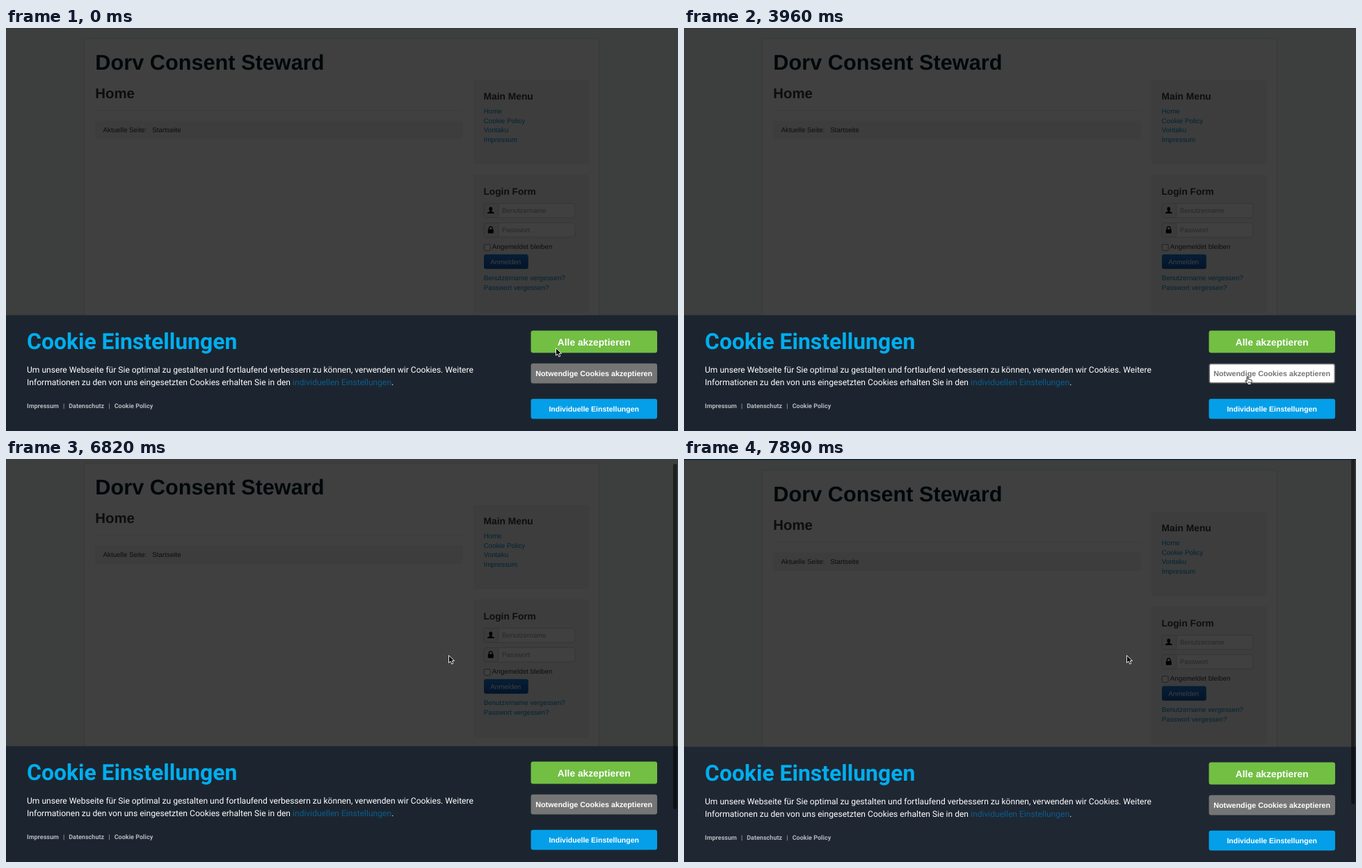
An HTML page for the animation above (8000 ms loop, 966 by 580 pixels).

```html
<!DOCTYPE html>
<html lang="de">
<head>
<meta charset="utf-8">
<title>Cookie Einstellungen</title>
<style>
  html, body { margin: 0; width: 100%; height: 100%; overflow: hidden; background: #1c252f; }
  svg { display: block; width: 966px; height: 580px; text-rendering: geometricPrecision; }
  text { white-space: pre; }
  .page text { font-family: "Liberation Sans", Arial, sans-serif; }
  .banner text { font-family: Roboto, sans-serif; }
  .banner .btn text { font-family: "Liberation Sans", Arial, sans-serif; font-weight: 700; text-anchor: middle; }
</style>
</head>
<body>
<svg id="stage" viewBox="0 0 966 580"></svg>
<script>
const stage = document.getElementById('stage');
const $ = id => document.getElementById(id);

const LINK = '#0088cc', INK = '#333';
const DURATION = 8000;

const rect = (x, y, w, h, fill, extra = '') =>
  `<rect x="${x}" y="${y}" width="${w}" height="${h}" fill="${fill}" ${extra}/>`;
const text = (x, y, size, fill, str, extra = '') =>
  `<text x="${x}" y="${y}" font-size="${size}" fill="${fill}" ${extra}>${str}</text>`;
const bold = 'font-weight="700"';
const small = (x, y, fill, str, extra) => text(x, y, 9.8, fill, str, extra);
const well = (x, y, w, h) => rect(x, y, w, h, '#f2f2f2', 'rx="3"');

function field(y, label) {
  return rect(687, y, 131, 20.5, '#fff', 'rx="3" stroke="#ccc" stroke-width=".8"') +
    rect(687, y, 21, 20.5, '#eee', 'rx="3" stroke="#ccc" stroke-width=".8"') +
    small(713, y + 13.6, '#999', label);
}

function page() {
  const menu = ['Home', 'Cookie Policy', 'Vontaku', 'Impressum'];
  return rect(0, -100, 966, 900, '#f4f6f7') +
    rect(0, -1.2, 966, 1.4, LINK) +
    rect(112.5, 15, 740, 425, '#fff', 'rx="3" stroke="#dcdcdc"') +
    text(128.3, 60.4, 30.7, '#001a27', 'Dorv Consent Steward', bold) +
    text(128.3, 101.3, 20.4, INK, 'Home', bold) +
    rect(128, 118, 529, .8, '#eee') +
    well(128, 133.5, 529, 26.5) +
    small(139.5, 149.6, INK, 'Aktuelle Seite:') +
    small(210.3, 149.6, INK, 'Startseite') +
    well(672, 75, 166, 121) +
    text(686.5, 103, 13.8, INK, 'Main Menu', bold) +
    menu.map((m, i) => small(686.7, 123.2 + i * 13.6, LINK, m)).join('') +
    well(672, 211, 166, 199) +
    text(686.5, 239.6, 13.7, INK, 'Login Form', bold) +
    field(252.5, 'Benutzername') + field(280.5, 'Passwort') +
    '<path d="M692 267v-1.6q2.6-.8 3.7-1.8q-1.3-1.4-1.3-3.6q0-2.6 2.4-2.6t2.4 2.6q0 2.2-1.3 3.6q1.1 1 3.7 1.8v1.6z"/>' +
    rect(692.8, 289.8, 8, 5.6, '#000', 'rx=".6"') +
    '<path d="M694.4 290v-1.8a2.4 2.4 0 0 1 4.8 0v1.8" fill="none" stroke="#000" stroke-width="1.3"/>' +
    rect(687.3, 311.5, 8.8, 8.8, '#fff', 'rx="1.5" stroke="#767676" stroke-width=".9"') +
    small(698.8, 318.3, INK, 'Angemeldet bleiben') +
    rect(687, 325.8, 63.8, 21, 'url(#blue)', 'rx="3"') +
    small(696.2, 339.5, '#fff', 'Anmelden') +
    small(686.7, 363.4, LINK, 'Benutzername vergessen?') +
    small(686.7, 377, LINK, 'Passwort vergessen?') +
    rect(128, 448, 710, .8, '#eaeaea') +
    small(128.3, 479, INK, '© 2020 Dorv Consent Steward') +
    small(838, 479, LINK, 'Nach oben', 'text-anchor="end"');
}

const buttons = [
  { id: 'all', y: 435.5, h: 32, color: '#72bf44', size: 13.75, dy: 21.4, label: 'Alle akzeptieren' },
  { id: 'need', y: 482.8, h: 28.6, color: '#757575', size: 10.75, dy: 18, label: 'Notwendige Cookies akzeptieren' },
  { id: 'own', y: 533.8, h: 28.8, color: '#049fe8', size: 10.5, dy: 18.2, label: 'Individuelle Einstellungen' }
];

const button = b => `<g class="btn" id="${b.id}">` +
  rect(755.3, b.y + .75, 180, b.h - 1.5, b.color, `rx="2.5" stroke="${b.color}" stroke-width="1.5"`) +
  text(845.2, b.y + b.dy, b.size, '#fff', b.label) + '</g>';

function banner() {
  const foot = [[30, 'Impressum'], [90.2, 'Datenschutz'], [155.7, 'Cookie Policy']];
  return rect(0, 413.3, 966, 164.7, '#1c252f', 'id="panel"') +
    text(30, 462, 31.9, '#00aeef', 'Cookie Einstellungen', bold) +
    text(30, 495.6, 12.08, '#fff', 'Um unsere Webseite für Sie optimal zu gestalten und fortlaufend verbessern zu können, verwenden wir Cookies. Weitere') +
    text(30, 513.8, 12.08, '#fff', 'Informationen zu den von uns eingesetzten Cookies erhalten Sie in den <tspan fill="#0b5d8d">individuellen Einstellungen</tspan>.') +
    foot.map(([x, s]) => text(x, 547, 9.06, '#b4b8bc', s, bold)).join('') +
    [82, 147.3].map(x => text(x, 547, 9.06, '#b4b8bc', '|')).join('') +
    buttons.map(button).join('');
}

// Each cursor is drawn from the top left corner of its box.
const cursors = {
  arrow: '<path d="M.5 .7V11.4L3 9.1L4.8 13.1L6.8 12.2L5.1 8.4H8.5Z" fill="#000" stroke="#fff" stroke-width=".9" stroke-linejoin="round"/>',
  beam: ['#fff" stroke-width="2.2', '#000" stroke-width="1'].map(s =>
    `<path d="M1 1Q3.5 1 3.5 3V11Q3.5 13 1 13M6 1Q3.5 1 3.5 3M3.5 11Q3.5 13 6 13M2.2 8.6H4.8" fill="none" stroke="${s}"/>`).join(''),
  hand: '<path d="M3.2 7.6V1.6Q3.2.5 4.1.5T5 1.6V4.6Q5.9 3.9 6.7 4.9Q7.7 4.3 8.4 5.3Q9.9 4.9 10.2 6.4V8.6L9.2 10.6V12.4H4.2V11L1 7.4Q.6 6.3 1.8 6.2Z" fill="#fff" stroke="#000" stroke-width=".9" stroke-linejoin="round"/>' +
    '<path d="M5.3 8V10.6M6.8 8V10.6M8.2 8V10.6" stroke="#000" stroke-width=".6"/>'
};

stage.innerHTML =
  '<defs><linearGradient id="blue" x2="0" y2="1"><stop stop-color="#1478d4"/><stop offset="1" stop-color="#0c50a4"/></linearGradient></defs>' +
  `<g class="page" id="page">${page()}</g>` +
  rect(0, 0, 966, 580, '#000', 'opacity=".75"') +
  rect(0, 560, 966, 18, '#fff') +
  `<g class="banner" id="banner">${banner()}</g>` +
  rect(0, 578, 966, 2, '#1c252f') +
  rect(959, 0, 5.5, 497, '#000', 'rx="2.7" opacity=".5" id="thumb"') +
  Object.keys(cursors).map(k => `<g id="${k}">${cursors[k]}</g>`).join('');

// time, cursor, x, y, hovered button, scroll, bounce past the edge, thumb top
const steps = [
  [0, 'arrow', 790, 460],
  [360, 'arrow', 693, 442],
  [2160, 'beam', 585, 487],
  [2520, 'beam', 320, 488],
  [2880, 'arrow', 147, 522],
  [3240, 'arrow', 227, 541],
  [3600, 'arrow', 799, 513],
  [3960, 'hand', 806, 501, 'need'],
  [5390, 'hand', 809, 461, 'all'],
  [5750, 'hand', 808, 461.5, 'all'],
  [6110, 'hand', 806, 510, 'need'],
  [6470, 'arrow', 649, 293],
  [6820, 'arrow', 636, 282, '', 9, 0, 7],
  [7180, 'arrow', 636, 282, '', 90, 0, 77],
  [7540, 'arrow', 636, 282, '', 91.5, 4.5, 79],
  [7890, 'arrow', 636, 282, '', 0, -1, 0]
];

const move = (el, x, y) => el.setAttribute('transform', `translate(${x} ${y})`);

function render(t) {
  const step = steps.filter(s => s[0] <= t).pop();
  const [, kind, x, y, hover = '', scroll = 0, bounce = 0, thumb = -1] = step;

  move($('page'), 0, -scroll - bounce);
  move($('banner'), 0, -bounce);
  $('panel').setAttribute('fill', bounce ? '#1f2732' : '#1c252f');

  for (const b of buttons) {
    const [box, label] = $(b.id).children;
    box.setAttribute('fill', b.id === hover ? '#fff' : b.color);
    label.setAttribute('fill', b.id === hover ? b.color : '#fff');
  }

  $('thumb').style.display = thumb < 0 ? 'none' : '';
  $('thumb').setAttribute('y', thumb);

  for (const k in cursors) $(k).style.display = k === kind ? '' : 'none';
  move($(kind), x, y);
}

const start = performance.now();
function tick() {
  render((performance.now() - start) % DURATION);
  requestAnimationFrame(tick);
}
tick();
</script>
</body>
</html>
```
